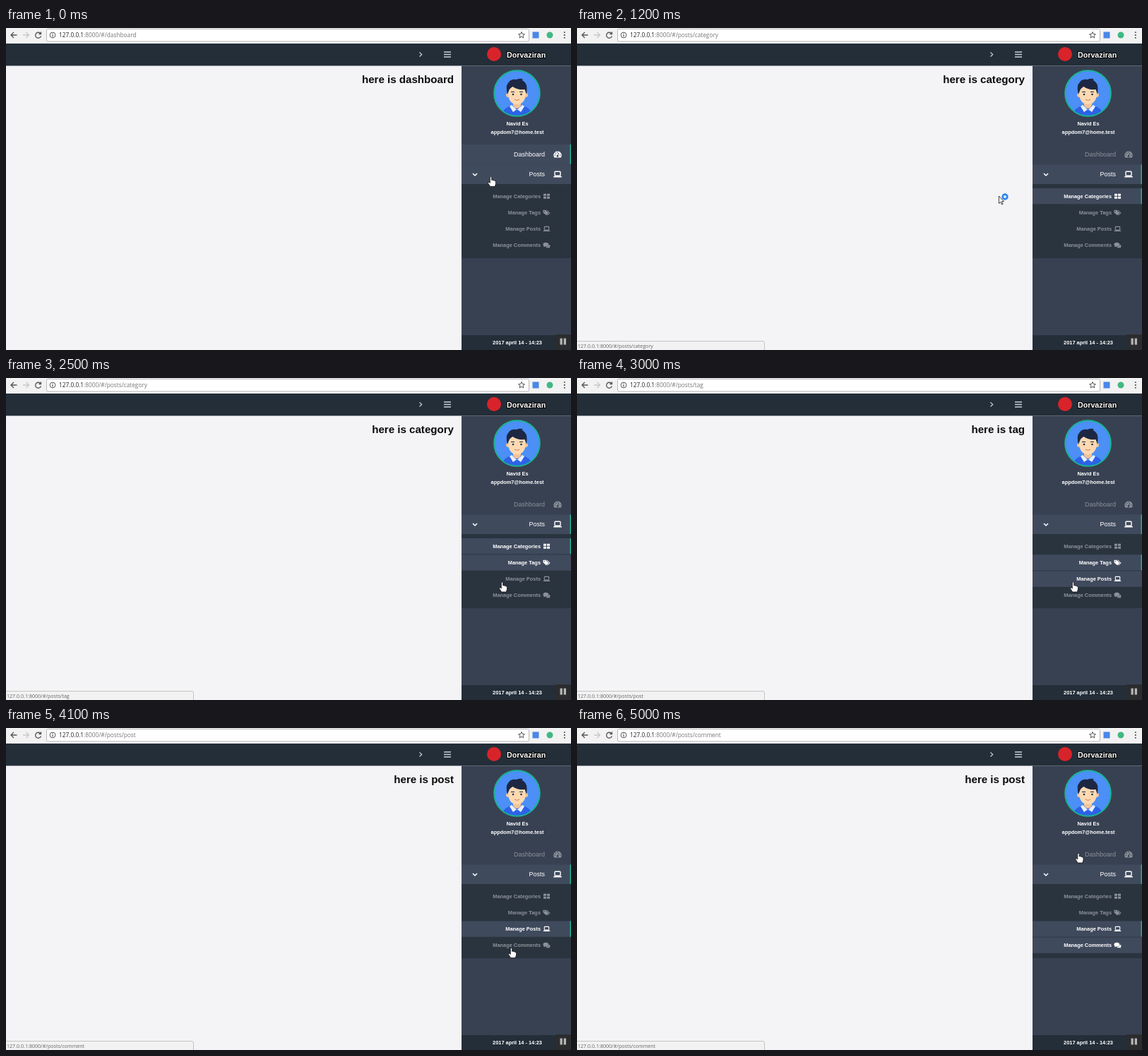
Recreate the animation shown at these times as an HTML page. Size 800 by 456 pixels, loop 5100 ms.

```html
<!DOCTYPE html>
<html>
<head>
<meta charset="utf-8">
<style>
  html, body { margin: 0; height: 100%; overflow: hidden; background: #f4f3f6; }
  svg { display: block; width: 800px; height: 456px; }
  text { font-family: "Liberation Sans", Arial, sans-serif; fill: currentColor; }
  .ui { font-family: "Open Sans", "Noto Sans", sans-serif; }
  .url { font-size: 8.3px; color: #777; }
  .bold { font-weight: bold; font-size: 7.4px; }
  .mid { text-anchor: middle; }
  .end { text-anchor: end; }
  .line { fill: none; stroke: currentColor; }
  .icon { fill: currentColor; }
  .white { color: #fff; }
</style>
</head>
<body>
<svg viewBox="0 0 800 456">
  <defs>
    <g id="laptop">
      <rect class="line" x="-4" y="-4" width="8" height="6" rx=".8" stroke-width="1.4"/>
      <rect class="icon" x="-6" y="2.8" width="12" height="1.5" rx=".7"/>
    </g>
    <g id="gauge">
      <path class="icon" d="M-4.6 4.5A5.7 5.7 0 1 1 4.6 4.5Z"/>
      <g fill="#394253"><circle cx="-3.6" cy="1" r=".8"/><circle cx="-2.5" cy="-1.8" r=".8"/><circle cy="-3" r=".8"/><circle cx="3.6" cy="1" r=".8"/><circle cy="2.4" r="1.4"/></g>
      <path d="M0 2.4L1.7-2" stroke="#394253"/>
    </g>
    <path id="grid" class="icon" d="M-4.5-3.5h4v3.2h-4zM.5-3.5h4v3.2h-4zM-4.5.5h4v3.2h-4zM.5.5h4v3.2h-4z"/>
    <g id="tags" class="icon">
      <path fill-rule="evenodd" d="M-5-3.5h3.5L2.8.6-.6 4-5-.2ZM-3.7-2.3v1.1h1.1v-1.1Z"/>
      <path d="M-.3-3.5h1L5 .6 1.4 4 .7 3.4 3.6.6Z"/>
    </g>
    <g id="chat" class="icon">
      <ellipse cx="-1.2" cy="-1" rx="3.8" ry="2.8"/><path d="M-3.5.5l-1 2.2 3-1Z"/>
      <path d="M3-1.2C6 0 5 2 4.1 2.6l.7 1.5-2.1-.8C.8 3.8-.6 3.2-1.2 2.5 1.5 2.3 3.2 1 3-1.2Z"/>
    </g>
  </defs>

  <!-- browser bar -->
  <rect width="800" height="22" fill="#f2f2f2"/>
  <rect x="57.5" y="1.5" width="683" height="17.500" rx="2" fill="#fff" stroke="#b9b9b9"/>
  <g class="line" stroke-width="1.3" color="#555">
    <path d="M15.500 10H7M11 6L7 10l4 4"/>
    <path d="M24 10h8.500M28.500 6l4 4-4 4" color="#c8c8c8"/>
    <path d="M49 8A4 4 0 1 0 49.500 11.500M49.500 5.500V8.500H46.500"/>
    <circle cx="66" cy="10" r="3.900" stroke-width="1"/><path d="M66 9.500v2.800M66 7.500v1"/>
    <path stroke-width="1" d="M730 5.500l1.300 3 3.100.3-2.400 2 .8 3.200-2.800-1.700-2.800 1.700.8-3.200-2.400-2 3.100-.3Z"/>
  </g>
  <rect x="745.500" y="5.500" width="9" height="9" fill="#4a86e8"/>
  <circle cx="770" cy="10" r="4.500" fill="#41b883"/>
  <path d="M789.900 5.300h1.800v1.800h-1.800zM789.900 9.100h1.800v1.800h-1.800zM789.900 12.900h1.800v1.800h-1.800z" fill="#555"/>
  <text class="ui url" x="75" y="13.200"><tspan fill="#222">127.0.0.1</tspan><tspan id="path"></tspan></text>

  <!-- page -->
  <text id="heading" class="end" x="634" y="78.300" font-size="15.1" font-weight="bold" color="#0a0a0a"></text>
  <rect y="22" width="800" height="31.500" fill="#232e39"/>
  <g class="line" color="#c9ced4">
    <path d="M585.500 34.500l3.200 3-3.200 3" stroke-width="1.200"/>
    <path d="M620 34h10M620 37.500h10M620 41h10" stroke-width="1.500"/>
  </g>

  <!-- sidebar -->
  <rect x="645" y="53.500" width="155" height="402.500" fill="#384152"/>
  <circle cx="691" cy="37" r="10" fill="#d8232a"/>
  <text class="white" x="709" y="41.800" font-size="10.7" font-weight="bold" stroke="#000" stroke-width="2" paint-order="stroke">Dorvaziran</text>

  <clipPath id="round"><circle cx="723.500" cy="92.500" r="32"/></clipPath>
  <g clip-path="url(#round)">
    <rect x="690" y="59" width="68" height="68" fill="#4b8ff7"/>
    <path d="M703 127v-6q1-8 13-11h15q12 3 13 11v6Z" fill="#2c62e6"/>
    <path d="M718 103h11v7q-5.500 8-11 0Z" fill="#f3c495"/>
    <path d="M716 109l7.500 7 7.500-7 3 2-5 8-5.500-4-5.500 4-5-8Z" fill="#e9f0ff"/>
    <circle cx="711" cy="95" r="3" fill="#f3c495"/><circle cx="736" cy="95" r="3" fill="#f3c495"/>
    <path d="M711 86q0-6 12.500-6t12.500 6v9q-2 13-12.500 13T711 95Z" fill="#fdd9b1"/>
    <path d="M710 94q-3-12 1-16 3-6 12-5 3-2 9-1-2 1-1 2 7 4 6.500 12l-.5 8-2.500-7q-11 1-17-4-5 3-5.500 6Z" fill="#1d2743"/>
    <path d="M715 90.500h5M727 90.500h5" stroke="#1d2743"/>
    <circle cx="718" cy="94" r="1.300" fill="#1d2743"/><circle cx="729.500" cy="94" r="1.300" fill="#1d2743"/>
    <path d="M720 101q3.500 3 7 0" fill="none" stroke="#c9774f"/>
  </g>
  <circle cx="723.500" cy="92.500" r="32.300" fill="none" stroke="#1bb394" stroke-width="2"/>
  <g class="bold mid white">
    <text x="724" y="137.700">Navid Es</text>
    <text x="724" y="149.700">appdom7@home.test</text>
  </g>

  <rect x="645" y="221" width="155" height="105" fill="#2a343f"/>
  <g id="menu"></g>
  <path class="line white" d="M661 206l3 3 3-3" stroke-width="1.500"/>
  <rect x="645" y="435" width="155" height="21" fill="#232e39"/>
  <text class="bold mid white" x="724" y="448.300" font-size="7.6">2017 april 14 - 14:23</text>
  <rect x="778" y="434" width="22" height="22" fill="#2b2c2e"/>
  <path d="M784.500 439.500h3.300v9h-3.300zM789.700 439.500h3.300v9h-3.300z" fill="#b5b5b5"/>

  <g id="status">
    <path d="M-1 443.500H263q2.500 0 2.500 2.500V457H-1Z" fill="#f2f2f2" stroke="#c4c4c4"/>
    <text class="ui" x="1" y="453" font-size="7.1" color="#666"></text>
  </g>

  <!-- pointers, tip at 0,0 -->
  <path id="hand" d="M-1.200 1Q0-.8 1.200 1V5Q2.500 4 3.300 5.300 4.700 4.600 5.300 6 7 5.500 7 7.300V10L5.800 14H-.8L-4 9.300Q-4.200 7.300-2.500 7.800L-1.200 9Z" fill="#fff" stroke="#111" stroke-width=".8"/>
  <g id="arrow">
    <path d="M.4 0V10.500L2.800 8.300 4.500 12 6 11.300 4.400 7.700H7.500Z" fill="#fff" stroke="#111" stroke-width=".8"/>
    <circle cx="9" cy="1" r="3.400" fill="#d8ebff" stroke="#2f86e8" stroke-width="2.600"/>
  </g>
</svg>
<script>
const LOOP = 5100;
const $ = id => document.getElementById(id);

// label, icon, top, height, lit from, lit until, active from, active until
const rows = [
  ['Dashboard', 'gauge', 165, 28, -200, 1200, 0, 1200],
  ['Posts', 'laptop', 193.500, 27.500, -200, LOOP, 1200, LOOP],
  ['Manage Categories', 'grid', 227, 22.300, 500, 3000, 1200, 3000],
  ['Manage Tags', 'tags', 250.200, 22.300, 2000, 4100, 3000, 4100],
  ['Manage Posts', 'laptop', 273.400, 22.300, 3000, LOOP, 4100, LOOP],
  ['Manage Comments', 'chat', 296.500, 22.300, 4500, LOOP, LOOP, LOOP]
].map(([label, icon, top, height, on, off, activeOn, activeOff], i) => {
  const sub = i > 1, mid = top + height / 2;
  $('menu').insertAdjacentHTML('beforeend', `<g>
    <rect x="645" y="${top}" width="155" height="${height}" fill="#404a5d"/>
    <rect x="798.500" y="${top}" width="1.500" height="${height}" fill="#1bb394"/>
    <text class="end ${sub ? 'bold' : ''}" x="${sub ? 757 : 763}" y="${mid + (sub ? 2.600 : 3.100)}" font-size="9">${label}</text>
    <use href="#${icon}" transform="translate(${sub ? 765.500 : 781} ${mid}) scale(${sub && icon == 'laptop' ? .8 : 1})"/>
  </g>`);
  const group = $('menu').lastElementChild;
  return { group, on, off, activeOn, activeOff };
});

const pages = [[0, 'dashboard'], [1200, 'posts/category'], [3000, 'posts/tag'], [4100, 'posts/post'], [5000, 'posts/comment']];
const headings = [[0, 'dashboard'], [1200, 'category'], [3000, 'tag'], [4100, 'post']];
const links = [[0, ''], [800, 'category'], [1800, 'tag'], [3000, 'post'], [3700, 'comment']];
// time, x, y, pointer
const moves = [
  [0, 686.500, 210.500, 'hand'], [100, 690, 216, 'hand'], [300, 701.500, 233.500, 'hand'],
  [1200, 597, 238, 'arrow'], [1500, 620, 241, 'arrow'], [1600, 662, 250, 'hand'],
  [1700, 688, 255, 'hand'], [1800, 702, 258, 'hand'], [2500, 702.500, 289, 'hand'],
  [3300, 703, 291, 'hand'], [3400, 705, 295, 'hand'], [3600, 712, 307, 'hand'],
  [3700, 715.500, 311.500, 'hand'], [5000, 710, 177, 'hand']
];

const at = (keys, t) => keys.findLast(key => key[0] <= t);
const show = (el, visible) => el.style.display = visible ? '' : 'none';

function draw(t) {
  for (const { group, on, off, activeOn, activeOff } of rows) {
    const lit = t >= on && t < off;
    const fadingIn = lit && t < on + 100 && on != 3000;
    const [back, bar] = group.children;
    show(back, lit);
    show(bar, t >= activeOn && t < activeOff);
    group.style.color = fadingIn ? '#d5d8dc' : lit ? '#fff' : '#8b9199';
  }
  $('path').textContent = ':8000/#/' + at(pages, t)[1];
  $('heading').textContent = 'here is ' + at(headings, t)[1];

  const link = at(links, t)[1];
  show($('status'), link);
  $('status').lastElementChild.textContent = '127.0.0.1:8000/#/posts/' + link;

  const [, x, y, pointer] = at(moves, t);
  for (const id of ['hand', 'arrow']) show($(id), id == pointer);
  $(pointer).setAttribute('transform', `translate(${x} ${y})`);
}

function tick() {
  draw(performance.now() % LOOP);
  requestAnimationFrame(tick);
}
tick();
</script>
</body>
</html>
```
